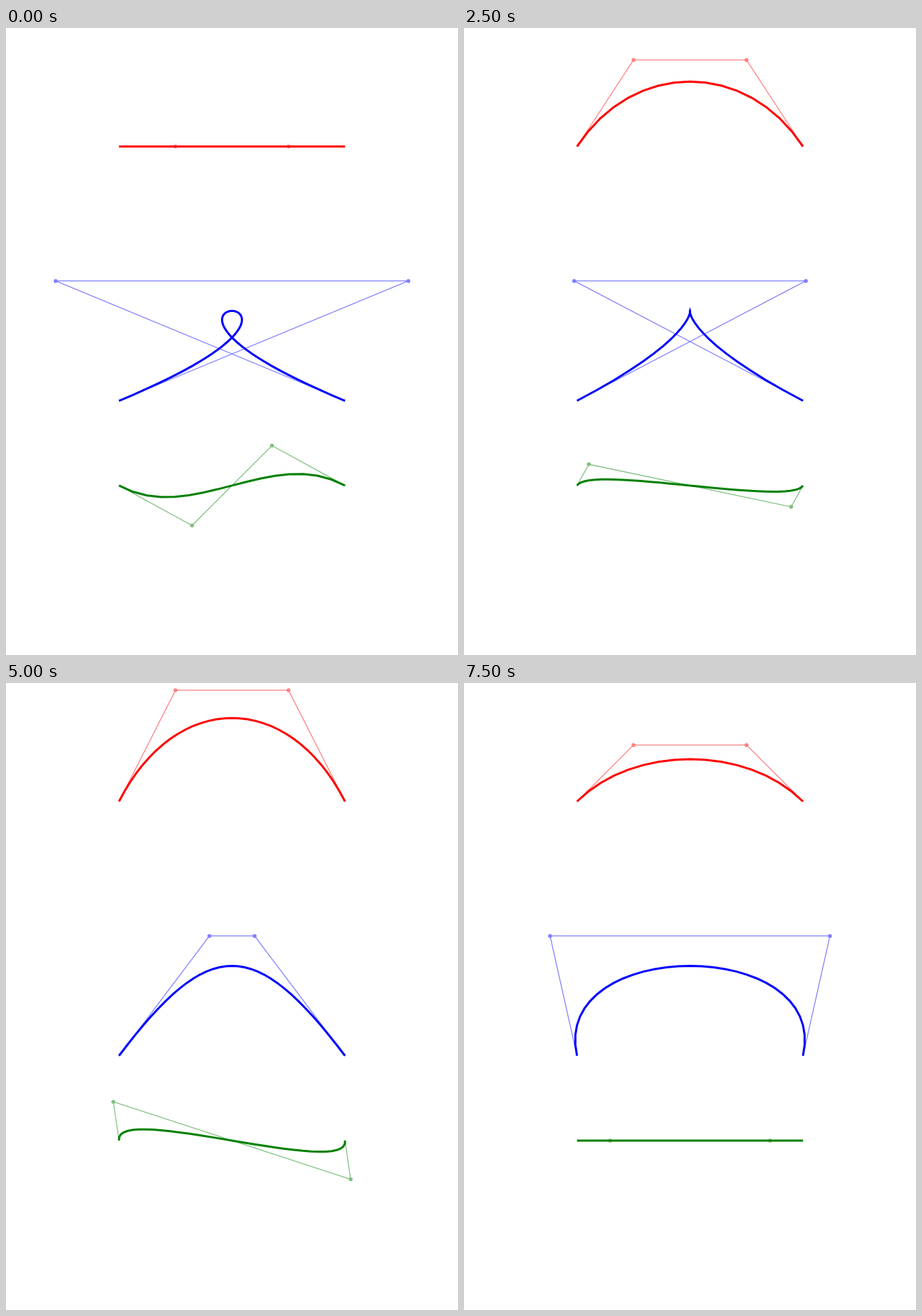
Animation of 635 by 881 pixels, one loop 8000 ms. Source, as an HTML page with a canvas:

```html
<!DOCTYPE html>
<html lang="en">
<head>
<meta charset="utf-8">
<title>Cubic curves with moving handles</title>
<style>
html, body { margin: 0; width: 100%; height: 100%; overflow: hidden; background: #fff; }
canvas { display: block; }
</style>
</head>
<body>
<canvas id="stage" width="635" height="881"></canvas>
<script>
const ctx = document.getElementById('stage').getContext('2d');
const LOOP = 8000, STEP = 500;
const MID = 317.5, U = 158.75;
const LEFT = MID - U, RIGHT = MID + U;

function stroke(points, color, width) {
  ctx.beginPath();
  for (const [x, y] of points) ctx.lineTo(x, y);
  ctx.strokeStyle = color;
  ctx.lineWidth = width;
  ctx.stroke();
}

function dot([x, y], color) {
  ctx.beginPath();
  ctx.arc(x, y, 2.75, 0, 2 * Math.PI);
  ctx.fillStyle = color;
  ctx.fill();
}

// Number of chords grows with the bend of the control polygon
function chordCount([a, b, c, d]) {
  const bend = i => Math.max(Math.abs(a[i] - 2 * b[i] + c[i]), Math.abs(b[i] - 2 * c[i] + d[i]));
  const level = Math.ceil(Math.log2((bend(0) + bend(1)) / 57) / 2);
  return 8 * 2 ** Math.max(0, level);
}

function flatten(poly) {
  const n = chordCount(poly);
  const [a, b, c, d] = poly;
  return Array.from({ length: n + 1 }, (_, i) => {
    const t = i / n, s = 1 - t;
    return [0, 1].map(k =>
      s * s * s * a[k] + 3 * s * s * t * b[k] + 3 * s * t * t * c[k] + t * t * t * d[k]);
  });
}

function curve(y, p1, p2, color, pale) {
  const poly = [[LEFT, y], p1, p2, [RIGHT, y]];
  stroke(poly, pale, 1.25);
  dot(p1, pale);
  dot(p2, pale);
  stroke(flatten(poly), color, 3);
}

function draw(angle) {
  const sin = Math.sin(angle), cos = Math.cos(angle);
  ctx.fillStyle = '#fff';
  ctx.fillRect(0, 0, 635, 881);

  // Handles rise and fall together
  const redY = 166.5, lift = redY - U * sin;
  curve(redY, [MID - U / 2, lift], [MID + U / 2, lift], '#ff0000', '#ff8080');

  // Handles swap sides
  const top = 355.4, drop = 0.75 * Math.SQRT2 * U;
  const reach = drop - U + 1.5 * U * cos;
  curve(top + drop, [MID + reach, top], [MID - reach, top], '#0000ff', '#8080ff');

  // Handles slide along opposite diagonals
  const greenY = 642.9, r = U * Math.SQRT1_2;
  const slide = r * (0.5 - sin);
  curve(greenY, [MID - r + slide, greenY + slide], [MID + r - slide, greenY - slide],
    '#008000', '#80c080');
}

function tick(now) {
  const step = Math.floor((now % LOOP) / STEP);
  draw(step * Math.PI / 18);
  requestAnimationFrame(tick);
}

draw(0);
const start = performance.now();
requestAnimationFrame(() => tick(performance.now()));
</script>
</body>
</html>
```
